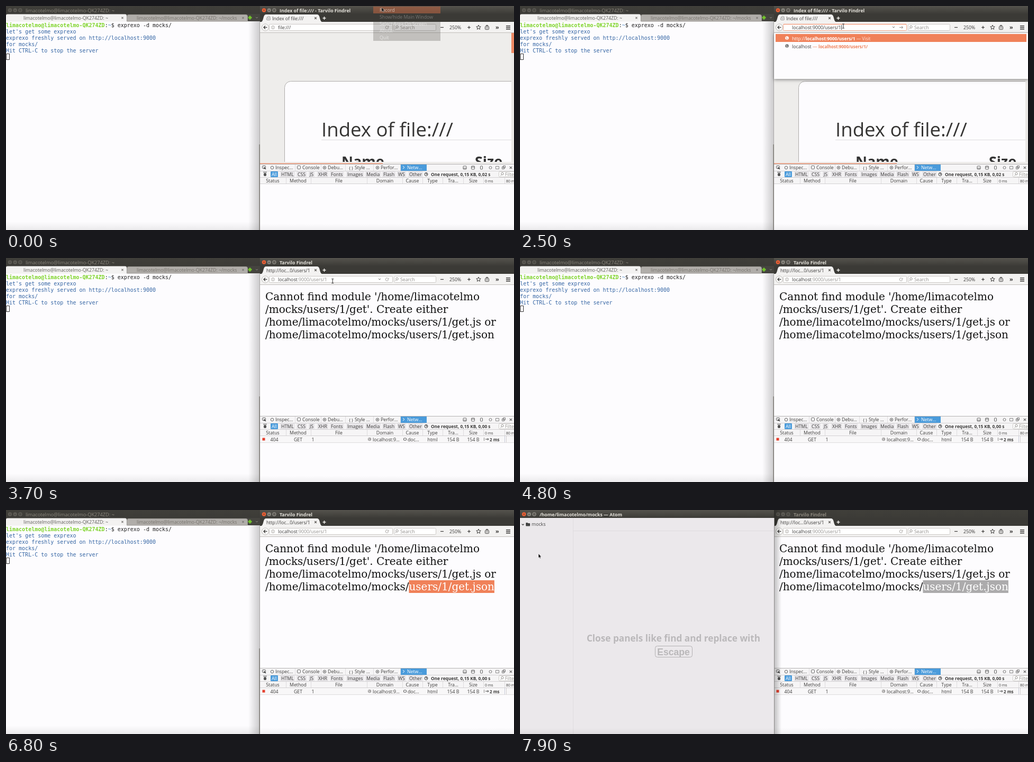
An HTML page with a canvas for the animation above (8000 ms loop, 960 by 424 pixels).

```html
<!DOCTYPE html>
<html lang="en">
<head>
<meta charset="utf-8">
<title>Mock server demo</title>
<style>
html, body { margin: 0; width: 100%; height: 100%; overflow: hidden; background: #fdfcfe; }
canvas { display: block; }
</style>
</head>
<body>
<canvas id="stage" width="960" height="424"></canvas>
<script>
const ctx = document.getElementById('stage').getContext('2d');
const LOOP = 8000, STEP = 100;
const UI = '"Open Sans", "Noto Sans", sans-serif';
const MONO = '"DejaVu Sans Mono", monospace';
const SERIF = '"DejaVu Serif", serif';
const USER = 'limacotelmo';
const HOST = USER + '@' + USER + '-QK274ZD';
const BROWSER = 'Tarvilo Findrel';
const ADDRESS = 'localhost:9000/users/1';
const ORANGE = '#f08159', INK = '#3c3b3a', GREY = '#93908d';
const ERROR = [
  `Cannot find module '/home/${USER}`,
  "/mocks/users/1/get'. Create either",
  `/home/${USER}/mocks/users/1/get.js or`,
  `/home/${USER}/mocks/users/1/get.json`
];

function rect(x, y, w, h, color) {
  ctx.fillStyle = color;
  ctx.fillRect(x, y, w, h);
}

function box(x, y, w, h, radius, fill, stroke) {
  ctx.beginPath();
  ctx.roundRect(x, y, w, h, radius);
  if (fill) { ctx.fillStyle = fill; ctx.fill(); }
  if (stroke) { ctx.strokeStyle = stroke; ctx.stroke(); }
}

function disc(x, y, r, fill, stroke) {
  box(x - r, y - r, 2 * r, 2 * r, r, fill, stroke);
}

// Polyline from a flat list of coordinates.
function line(color, width, ...p) {
  ctx.beginPath();
  for (let i = 0; i < p.length; i += 2) ctx.lineTo(p[i], p[i + 1]);
  ctx.strokeStyle = color;
  ctx.lineWidth = width;
  ctx.stroke();
  ctx.lineWidth = 1;
}

// Draws text and returns the x where it ends.
function text(s, x, y, { size = 8.75, color = INK, weight = 400, font = UI, align = 'left' } = {}) {
  ctx.font = `${weight} ${size}px ${font}`;
  ctx.fillStyle = color;
  ctx.textAlign = align;
  ctx.fillText(s, x, y);
  return x + ctx.measureText(s).width;
}

function fade(x, y, w, h, x0, y0, x1, y1, alpha) {
  const g = ctx.createLinearGradient(x0, y0, x1, y1);
  g.addColorStop(0, 'rgba(0,0,0,0)');
  g.addColorStop(1, `rgba(0,0,0,${alpha})`);
  rect(x, y, w, h, g);
}

function cross(x, y, r, color, width = 1.2) {
  line(color, width, x - r, y - r, x + r, y + r);
  line(color, width, x - r, y + r, x + r, y - r);
}

function plus(x, y, r, color, width = 1.3) {
  line(color, width, x - r, y, x + r, y);
  line(color, width, x, y - r, x, y + r);
}

function magnifier(x, y) {
  disc(x, y - 1, 2.2, null, GREY);
  line(GREY, 1, x - 1.5, y + .8, x - 3.5, y + 3);
}

function reload(x, y, color) {
  ctx.beginPath();
  ctx.arc(x, y, 2.8, .3, 5.2);
  ctx.strokeStyle = color;
  ctx.stroke();
  line(color, 1, x + 3, y - 3, x + 3, y - .5, x + .5, y - .5);
}

// Paints a window's title bar and returns its text colour.
function titleBar(x, active) {
  const g = ctx.createLinearGradient(0, 0, 0, 15);
  g.addColorStop(0, active ? '#55534d' : '#403f3a');
  g.addColorStop(1, '#3c3b37');
  rect(x, 0, 480, 15, g);
  const glyph = active ? 'rgba(40,35,30,.7)' : '#3f3e39';
  [ORANGE, '#84827b', '#84827b'].forEach((color, i) => {
    const cx = x + 7.5 + i * 9.7;
    disc(cx, 8, 3.8, active ? (i ? color : '#ec6036') : '#5c5a54');
    if (i === 0) cross(cx, 8, 1.3, glyph, .9);
    else if (i === 1) line(glyph, .9, cx - 1.6, 8.5, cx + 1.6, 8.5);
    else box(cx - 1.3, 6.7, 2.6, 2.6, 0, null, glyph);
  });
  return active ? '#e6e3dc' : '#8b877d';
}

function terminal() {
  rect(0, 0, 480, 424, '#fdfcfe');
  const color = titleBar(0, false);
  text(HOST + ': ~', 37, 11.5, { size: 9.2, color });
  rect(0, 15, 480, 14, '#45443f');
  box(0, 15.5, 228, 14, [3, 3, 0, 0], '#f3f2f1');
  box(228.5, 16.5, 228, 12.5, [3, 3, 0, 0], '#b0ada9', '#9a9793');
  text(HOST + ': ~', 33, 26, { color: '#5f5d5a' });
  text(HOST + ': ~/mocks', 247, 26, { color: '#77736d' });
  cross(220, 22.5, 1.6, '#7b7875');
  cross(448, 22.5, 1.6, '#7b7875');
  plus(461, 22, 3.5, '#72c52a', 3);
  line('#8a8781', 1, 472, 21, 474, 23, 476, 21);

  const mono = { size: 10, font: MONO };
  let x = text(HOST, 0, 40, { ...mono, weight: 700, color: '#7fd42a' });
  x = text(':', x, 40, { ...mono, color: '#222' });
  x = text('~', x, 40, { ...mono, weight: 700, color: '#729fcf' });
  text('$ exprexo -d mocks/', x, 40, { ...mono, color: '#222' });
  ["let's get some exprexo", 'exprexo freshly served on http://localhost:9000',
    'for mocks/', 'Hit CTRL-C to stop the server'].forEach((s, i) =>
    text(s, 0, 52 + i * 12, { ...mono, color: '#3465a4' }));
  box(.5, 90.5, 6, 11, 0, null, '#333');
  fade(0, 408, 480, 16, 0, 408, 0, 424, .07);
  fade(458, 29, 22, 395, 458, 0, 480, 0, .2);
  rect(479, 29, 1, 233, '#a9a7a6');
  rect(478.5, 262, 1.5, 162, '#77746f');
}

function editor() {
  rect(0, 15, 480, 409, '#ebe8eb');
  const color = titleBar(0, true);
  text(`/home/${USER}/mocks — Atom`, 37, 11.5, { color, weight: 700 });
  rect(100, 15, 1, 409, '#dfdcdf');
  rect(100, 39, 380, 1, '#dfdcdf');
  line('#444', 1.1, 3.5, 26.5, 5.5, 28.5, 7.5, 26.5);
  box(11, 24, 4, 3, 1, '#444');
  box(11, 25, 8, 5.5, 1, '#444');
  text('mocks', 22, 30, { color: '#444' });
  const hint = { color: '#bab8ba', weight: 700, align: 'center' };
  text('Close panels like find and replace with', 290, 248.5, { ...hint, size: 17.2 });
  box(255.5, 257.5, 70, 21, 4, null, '#b3b1b3');
  text('Escape', 290, 274.5, { ...hint, size: 17.6, font: '"Liberation Sans", sans-serif' });
  fade(0, 412, 480, 12, 0, 412, 0, 424, .05);
}

function addressBar(t) {
  const focused = t >= 1000 && t < 2600;
  const hovered = t >= 500 && t < 4200;
  box(497.5, 34.5, 233, 12, 2, '#fff', focused ? '#f2a98c' : '#cbc8c5');
  if (focused) line(ORANGE, 1, 498, 34.5, 730, 34.5);
  if (hovered) line('#66635f', 1, 704, 39, 706, 41, 708, 39);
  if (t < 1700 || !focused) {
    disc(504.5, 40.5, 3, null, '#aaa7a4');
    line('#aaa7a4', 1, 504.5, 40, 504.5, 42.3);
    rect(504, 38.3, 1, 1, '#aaa7a4');
  }
  if (focused && t >= 1700) {
    line('#8c8986', 1, 717, 40.5, 723, 40.5);
    line('#8c8986', 1, 721, 38, 723.5, 40.5, 721, 43);
  } else reload(720, 40.5, '#a5a29f');

  if (t < 1700) {
    if (focused) rect(514, 36, 27, 9, ORANGE);
    text('file:///', 514, 43.5, { color: focused ? '#fff' : INK });
  } else if (t < 2100) {
    text('Search or enter address', 514, 43.5, { color: GREY });
    rect(514, 36, 1, 9, '#444');
  } else if (focused) {
    const typed = ADDRESS.slice(0, Math.ceil(ADDRESS.length * (t - 2000) / 500));
    rect(text(typed, 514, 43.5) + .5, 36, 1, 9, '#444');
  } else {
    text(ADDRESS.slice(9), text(ADDRESS.slice(0, 9), 514, 43.5), 43.5, { color: GREY });
  }
}

function browserChrome(t) {
  const loaded = t >= 2700;
  const color = titleBar(480, t < 7600);
  text((loaded ? '' : 'Index of file:/// - ') + BROWSER, 517, 11.5, { color, weight: 700 });
  rect(480, 15, 480, 16, '#3b3a36');
  rect(480, 30, 480, 20, '#f3f2f1');
  ctx.beginPath();
  ctx.moveTo(480, 31);
  ctx.bezierCurveTo(488, 31, 485, 16, 491, 16);
  ctx.lineTo(588, 16);
  ctx.bezierCurveTo(595, 16, 591, 31, 600, 31);
  ctx.fillStyle = '#f3f2f1';
  ctx.fill();
  if (loaded) text('http://loc…0/users/1', 492, 26.5);
  else {
    box(492.5, 22.5, 7, 4, 1, '#ddd', '#999');
    line('#999', 1, 493, 22, 495, 19.5, 498, 19.5, 499.5, 22);
    text('Index of file:///', 503, 26.5);
  }
  cross(585, 23, 1.9, '#55524f');
  plus(601.5, 23, 3, '#f0efec', 1.5);

  addressBar(t);
  disc(490, 40.5, 6.5, '#fbfbfa', '#bdbab7');
  line(INK, 1.3, 487, 40.5, 493.5, 40.5);
  line(INK, 1.3, 490, 37.5, 487, 40.5, 490, 43.5);
  box(733.5, 34.5, 79, 12, 2, '#fff', '#cbc8c5');
  magnifier(739, 40.5);
  text('Search', 745, 43.5, { color: GREY });
  line(INK, 1.2, 821, 40.5, 827, 40.5);
  text('250%', 838, 43.5);
  plus(875, 40.5, 2.8, INK, 1.2);
  ctx.beginPath();
  for (let i = 0; i < 10; i++) {
    const r = i % 2 ? 2 : 4.5, a = i * Math.PI / 5 - Math.PI / 2;
    ctx.lineTo(893 + r * Math.cos(a), 40.5 + r * Math.sin(a));
  }
  ctx.closePath();
  ctx.strokeStyle = INK;
  ctx.stroke();
  box(905.5, 38.5, 7, 6, 1, null, INK);
  box(907.5, 36.5, 3, 2, 0, null, INK);
  line(INK, 1, 907, 41.5, 911, 41.5);
  text('»', 925, 43.5, { size: 11, weight: 700 });
  for (let i = 0; i < 3; i++) rect(945, 37 + i * 3, 8, 1.5, INK);
  rect(480, 50, 480, 1, '#c1bebb');
}

function indexPage() {
  ctx.save();
  ctx.beginPath();
  ctx.rect(480, 51, 480, 244);
  ctx.clip();
  rect(480, 51, 480, 244, '#eeedeb');
  box(526.5, 142.5, 460, 200, 12, '#fdfcfe', '#aeacaa');
  text('Index of file:///', 596, 246.5, { size: 36.6, color: '#363534' });
  rect(596, 253, 359, 1, '#dddbdd');
  text('Name', 634, 304, { size: 27, weight: 700, color: '#333' });
  text('Size', 886, 304, { size: 27, weight: 700, color: '#333' });
  rect(955, 51, 5, 244, '#eae8e6');
  rect(955, 51, 5, 38, '#ee8a65');
  ctx.restore();
  rect(480, 295, 480, 5, '#efedeb');
  rect(480, 297.5, 232, 1.5, '#f09a7a');
}

function errorPage(t) {
  rect(480, 51, 480, 249, '#fdfcfe');
  const style = { size: 20, font: SERIF, color: '#111' };
  ERROR.forEach((s, i) => text(s, 490, 80 + i * 24, style));
  const chosen = 'users/1/get.json';
  const from = 490 + ctx.measureText(ERROR[3].slice(0, -chosen.length)).width;
  const count = Math.round(chosen.length * Math.min(1, Math.max(0, (t - 5400) / 900)));
  if (count) {
    const part = chosen.slice(0, count);
    rect(from, 133, ctx.measureText(part).width, 24, t < 7600 ? ORANGE : '#acabac');
    text(part, from, 152, { ...style, color: '#fff' });
  }
}

function suggestions() {
  ctx.save();
  ctx.shadowColor = 'rgba(0,0,0,.4)';
  ctx.shadowBlur = 6;
  ctx.shadowOffsetY = 2;
  rect(480, 51, 480, 87, '#fdfcfe');
  ctx.restore();
  rect(483, 53, 474, 15, ORANGE);
  [61, 76].forEach((y, i) => {
    disc(504.5, y - .5, 3.3, i ? '#777' : '#fff');
    line(i ? '#ddd' : ORANGE, 1, 502.5, y - 2, 505, y, 504, y + 2);
  });
  const white = { color: '#fff' };
  let x = text('http://', 514, 64.5, white);
  x = text(ADDRESS, x, 64.5, { ...white, weight: 700, size: 8.4 });
  text(' — Visit', x, 64.5, { color: '#fde3d8', size: 8.4 });
  x = text('localhost', 514, 79.5);
  x = text(' — ', x, 79.5, { color: ORANGE });
  text(ADDRESS + '/', x, 79.5, { color: ORANGE, weight: 700, size: 8 });
}

function devtools(t) {
  rect(480, 299, 480, 125, '#fdfcfe');
  rect(480, 299, 480, 1, '#b5b3b3');
  rect(480, 300, 480, 37, '#f6f5f6');
  [312, 324, 336].forEach(y => rect(480, y, 480, 1, '#d3d1d3'));
  rect(746, 300, 49, 12, '#4a9bdb');
  box(484.5, 302.5, 6, 5, 1, null, '#555');
  line('#333', 1.2, 491, 309, 488, 305.5, 488, 308.5);
  const tabs = [[509, 'Inspec…'], [560, 'Console'], [608, 'Debu…'],
    [659, 'Style …'], [708, 'Perfor…'], [758, 'Netw…']];
  tabs.forEach(([x, s], i) => {
    const color = i === 5 ? '#fff' : INK;
    text(s, x, 309, { color });
    if (i === 1) box(x - 9.5, 302.5, 6, 6, 1, null, '#666');
    else if (i === 3) text('{ }', x - 11, 308.5, { size: 8 });
    else if (i === 5) line(color, 1, x - 8, 303, x - 5, 305.5, x - 8, 308);
    else {
      disc(x - 6, 306, 2.8, null, '#666');
      if (i) rect(x - 7, 305, 2, 2, '#666');
    }
    if (i < 5) rect([546, 595, 641, 694, 745][i], 300, 1, 12, '#dfdde0');
  });
  [867, 882.5, 898.5].forEach((x, i) => {
    const w = i === 2 ? 4 : 6;
    box(x - w / 2, 303, w, 6, 1, null, '#666');
    if (i < 2) line('#666', 1, x - 3, i ? 305 : 307, x + 3, i ? 305 : 307);
  });
  disc(915.5, 306, 2.5, null, '#777');
  box(925.5, 303.5, 6, 5, 0, null, '#888');
  box(937.5, 304.5, 4, 4, 0, null, '#777');
  box(939.5, 302.5, 4, 4, 0, null, '#777');
  cross(954, 306, 2.2, '#666');

  box(487.5, 316.5, 4, 5, 1, '#555', '#555');
  line('#555', 1, 486, 314.5, 493, 314.5);
  const filters = [[502, 'All'], [520, 'HTML'], [551, 'CSS'], [574, 'JS'], [590, 'XHR'],
    [614, 'Fonts'], [645, 'Images'], [681, 'Media'], [713, 'Flash'], [741, 'WS'], [762, 'Other']];
  filters.forEach(([x, s], i) => {
    ctx.font = `8.75px ${UI}`;
    box(x - 2, 313, ctx.measureText(s).width + 4, 11, 1, i ? '#e8e6e9' : '#4a9bdb');
    text(s, x, 321.5, { color: i ? INK : '#fff' });
  });
  disc(794, 318.5, 3, null, '#333');
  line('#333', 1, 794, 316, 794, 318.5, 796, 318.5);
  const shown = t >= 2900;
  text(`One request, 0,15 KB, ${shown ? '0,00' : '0,02'} s`, 803, 321.5, { weight: 700, size: 8.3 });
  box(931.5, 313.5, 40, 10, 2, '#fff', '#cbc8c5');
  magnifier(938, 318.5);
  text('Filter URLs', 943, 321.5, { color: GREY });

  const columns = [[504, 'Status'], [552, 'Method'], [629, 'File'], [716, 'Domain'],
    [768, 'Cause'], [806, 'Type'], [845, 'Tra…'], [883, 'Size']];
  columns.forEach(([x, s]) => text(s, x, 334, { align: 'center' }));
  [529, 576, 682, 749, 787, 825, 864, 902, 942].forEach(x => rect(x, 325, 1, 11, '#dddbdd'));
  text('0 ms', 905, 333.5, { size: 7 });
  text('80 ms', 945, 333.5, { size: 7 });

  if (shown) {
    rect(480, 337, 480, 12, '#f8f7f8');
    rect(480, 349, 480, 1, '#dedcde');
    rect(484.5, 340.5, 5, 5, '#e4402f');
    [[507, '404'], [552, 'GET'], [580, '1'], [806, 'html'], [845, '154 B'], [883, '154 B']]
      .forEach(([x, s]) => text(s, x, 346.5, { align: 'center' }));
    disc(687, 343, 3.2, '#aaa8a8');
    line('#e5e5e5', 1, 685, 341, 687, 343, 686, 345);
    text('localhost:9…', 693, 346.5);
    box(751.5, 341, 5, 4, 1, null, '#555');
    text('doc…', 759, 346.5);
    line('#8b8988', 1, 903.5, 340, 903.5, 346);
    line('#444', 1, 906, 343, 912, 343);
    line('#444', 1, 910, 341, 912, 343, 910, 345);
    text('2 ms', 914, 346.5, { weight: 700, size: 8 });
    rect(942, 337, 1, 12, '#c8cbd8');
    rect(945, 337, 1, 12, '#d0cfd0');
  }
  fade(480, 412, 480, 12, 0, 412, 0, 424, .05);
}

function trayMenu(alpha) {
  if (alpha <= 0) return;
  ctx.save();
  ctx.globalAlpha = alpha;
  rect(694, 1, 127, 65, 'rgba(60,59,55,.25)');
  rect(694, 1, 127, 13, 'rgba(240,119,70,.4)');
  ['Record', 'Show/hide Main Window', 'Select Area On Screen', 'About', 'Quit'].forEach((s, i) =>
    text(s, 706, 11 + i * 13, { color: i === 1 ? 'rgba(255,255,255,.3)' : 'rgba(255,255,255,.6)' }));
  ctx.restore();
}

function arrow(x, y) {
  ctx.beginPath();
  [[0, 0], [0, 7.5], [1.7, 6], [2.9, 8.8], [4, 8.3], [2.9, 5.6], [5.2, 5.4]]
    .forEach(([dx, dy]) => ctx.lineTo(x + dx, y + dy));
  ctx.closePath();
  ctx.fillStyle = '#111';
  ctx.fill();
  ctx.strokeStyle = 'rgba(255,255,255,.6)';
  ctx.lineWidth = .5;
  ctx.stroke();
  ctx.lineWidth = 1;
}

function ibeam(x, y) {
  line('#333', 1, x, y - 3.5, x, y + 3.5);
  line('#333', 1, x - 2, y - 4, x + 2, y - 4);
  line('#333', 1, x - 2, y + 4, x + 2, y + 4);
}

// Pointer path as [time, x, y], eased between stops.
const PATH = [[0, 710, 3], [500, 660, 40], [700, 655, 40], [1000, 611, 38], [3400, 611, 38],
  [3500, 612, 40], [3600, 612, 40], [4500, 765, 147], [5400, 763, 147], [6300, 924, 147], [6400, 924, 147]];

function pointer(t) {
  if (t >= 7700) return arrow(35, 83);
  if (t >= 6500) return;
  const next = Math.max(1, PATH.findIndex(p => p[0] >= t));
  const [t0, x0, y0] = PATH[next - 1];
  const [t1, x1, y1] = PATH[next];
  const u = Math.min(1, (t - t0) / (t1 - t0)), e = u * u * (3 - 2 * u);
  const x = x0 + (x1 - x0) * e, y = y0 + (y1 - y0) * e;
  if (t < 500) arrow(x, y);
  else ibeam(x, y);
}

function draw(t) {
  terminal();
  if (t >= 7600) {
    ctx.globalAlpha = Math.min(1, (t - 7500) / 200);
    editor();
    ctx.globalAlpha = 1;
  }
  browserChrome(t);
  if (t < 2700) indexPage();
  else errorPage(t);
  devtools(t);
  if (t >= 2100 && t < 2600) suggestions();
  if (t >= 7600) {
    fade(480, 0, 14, 424, 494, 0, 480, 0, .25);
    rect(480, 15, 1, 409, '#8d8b8b');
  }
  trayMenu(1 - t / 300);
  pointer(t);
}

function tick(now) {
  draw(Math.floor(now % LOOP / STEP) * STEP);
  requestAnimationFrame(tick);
}
requestAnimationFrame(tick);
</script>
</body>
</html>
```
